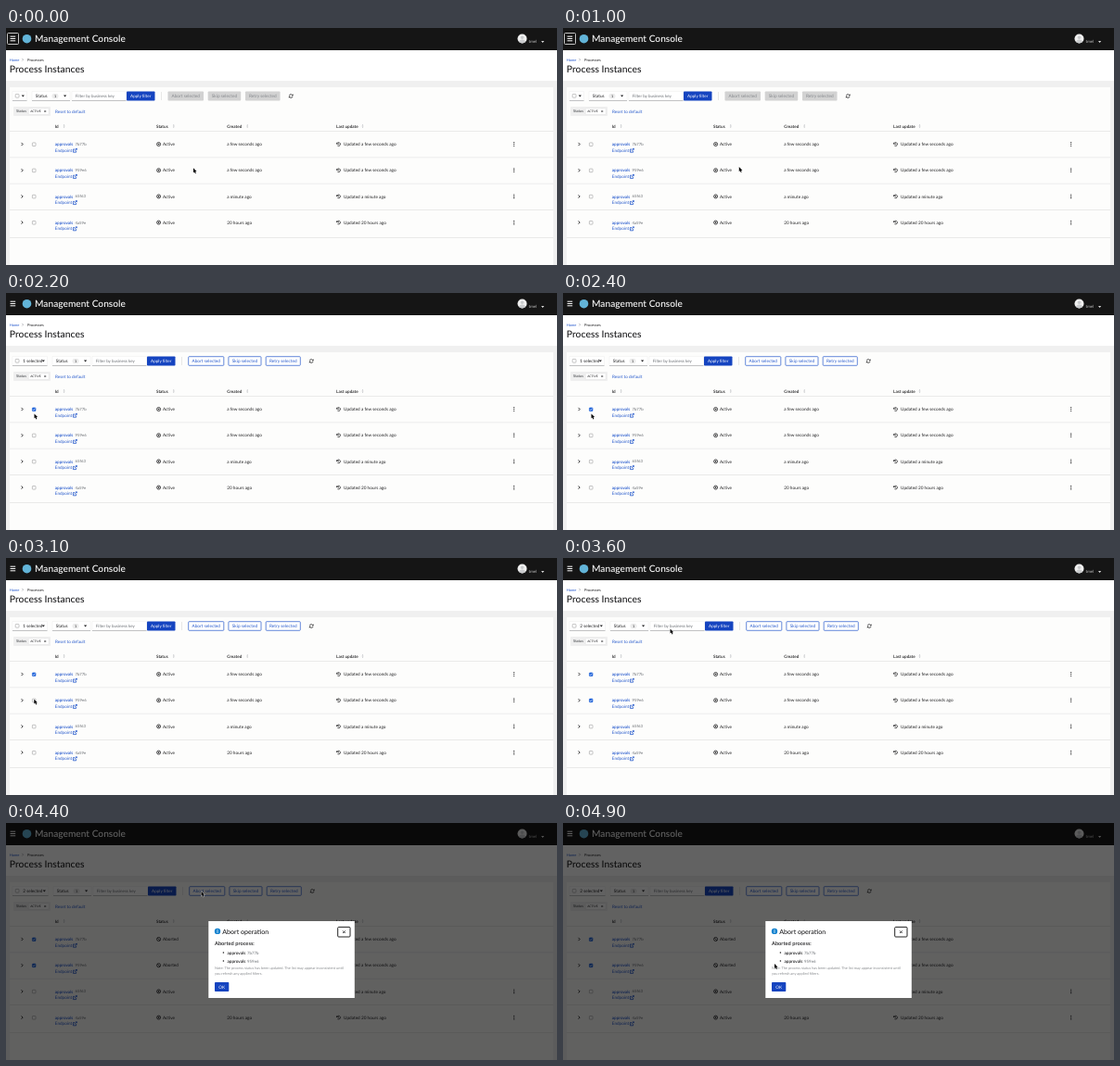
Recreate the animation shown at these times as an HTML page with a canvas. Size 594x256 px, loop 5 s.

```html
<!DOCTYPE html>
<html lang="en">
<head>
<meta charset="utf-8">
<title>Management Console</title>
<style>
html, body { margin: 0; width: 100%; height: 100%; overflow: hidden; background: #fff; }
canvas { display: block; width: 594px; height: 256px; }
</style>
</head>
<body>
<canvas id="stage"></canvas>
<script>
const W = 594, H = 256, LOOP = 5000, STEP = 100;
const BLUE = '#1544c0', LINK = '#2458cc', INK = '#1d1d1f', GREY = '#6a6e73', PALE = '#d2d2d2';
const canvas = document.getElementById('stage');
const dpr = window.devicePixelRatio || 1;
canvas.width = W * dpr;
canvas.height = H * dpr;
const ctx = canvas.getContext('2d');

// Text is laid out ten times larger, so that small advances are not rounded.
function text(str, x, cy, size = 4.7, color = INK, weight = 400, align = 'left') {
  ctx.save();
  ctx.translate(x, cy + size * 0.36);
  ctx.scale(0.1, 0.1);
  ctx.font = `${weight} ${size * 10}px Lato, "Open Sans", sans-serif`;
  ctx.textRendering = 'geometricPrecision';
  ctx.textAlign = align;
  ctx.fillStyle = color;
  ctx.fillText(str, 0, 0);
  ctx.restore();
}

function rect(x, y, w, h, color) {
  ctx.fillStyle = color;
  ctx.fillRect(x, y, w, h);
}

function box(x, y, w, h, r, fill, stroke, lw = 0.6) {
  ctx.beginPath();
  ctx.roundRect(x, y, w, h, r);
  if (fill) { ctx.fillStyle = fill; ctx.fill(); }
  if (stroke) { ctx.strokeStyle = stroke; ctx.lineWidth = lw; ctx.stroke(); }
}

function line(pts, color, lw = 0.7) {
  ctx.beginPath();
  pts.forEach(([x, y], i) => i ? ctx.lineTo(x, y) : ctx.moveTo(x, y));
  ctx.strokeStyle = color;
  ctx.lineWidth = lw;
  ctx.stroke();
}

function poly(pts, color) {
  ctx.beginPath();
  pts.forEach(([x, y]) => ctx.lineTo(x, y));
  ctx.closePath();
  ctx.fillStyle = color;
  ctx.fill();
}

function dot(x, y, r, color) {
  ctx.beginPath();
  ctx.arc(x, y, r, 0, Math.PI * 2);
  ctx.fillStyle = color;
  ctx.fill();
}

function ring(x, y, r, color, lw = 0.7, from = 0, to = Math.PI * 2) {
  ctx.beginPath();
  ctx.arc(x, y, r, from, to);
  ctx.strokeStyle = color;
  ctx.lineWidth = lw;
  ctx.stroke();
}

const caret = (x, y, color = INK) =>
  poly([[x - 1.6, y - 0.9], [x + 1.6, y - 0.9], [x, y + 1]], color);

function cross(x, y, r, color, lw) {
  line([[x - r, y - r], [x + r, y + r]], color, lw);
  line([[x + r, y - r], [x - r, y + r]], color, lw);
}

function checkbox(x, y, on) {
  box(x - 1.8, y - 1.8, 3.6, 3.6, 0.6, on ? '#1a5fd8' : '#fff', on ? '#1a5fd8' : '#9a9a9a', 0.6);
  if (on) line([[x - 1.1, y], [x - 0.3, y + 0.9], [x + 1.2, y - 1]], '#fff', 0.7);
}

function topBar(focus) {
  rect(0, 0, W, 24, '#151515');
  if (focus) box(1.5, 5.5, 12, 12, 1, null, '#d8d8d8', 0.9);
  for (const y of [9.2, 11.5, 13.8]) line([[4.6, y], [10.2, y]], '#fff', 1);
  dot(22.5, 11.7, 4.8, '#62b4d8');
  text('Management Console', 31, 11.8, 10.2, '#fff', 500);

  dot(556.5, 11.5, 5, '#f0f0f0');
  ctx.save();
  ctx.beginPath();
  ctx.arc(556.5, 11.5, 5, 0, Math.PI * 2);
  ctx.clip();
  dot(556.5, 10.3, 1.7, '#c9cbcd');
  dot(556.5, 16, 3.6, '#c9cbcd');
  ctx.restore();
  text('tmel', 563.6, 14.8, 4.4, '#c4c4c4');
  caret(578.6, 15, '#e0e0e0');
}

function pageHead() {
  rect(0, 24, W, 33, '#fff');
  text('Home', 3.8, 34.2, 4, LINK);
  line([[17.3, 32.9], [18.6, 34.2], [17.3, 35.5]], GREY, 0.5);
  text('Processes', 23, 34.2, 4.1);
  text('Process Instances', 3.8, 44, 10.4, INK, 500);
}

function field(x, w) {
  box(x, 68.5, w, 10, 0, '#fff', '#ececec', 0.5);
  rect(x, 78.1, w, 0.5, '#8a8d90');
}

function refresh(x, y) {
  ring(x, y, 1.9, INK, 0.7, Math.PI * 1.08, Math.PI * 1.85);
  ring(x, y, 1.9, INK, 0.7, Math.PI * 0.08, Math.PI * 0.85);
  poly([[x + 2.3, y - 2.2], [x + 2.3, y - 0.3], [x + 0.5, y - 0.3]], INK);
  poly([[x - 2.3, y + 2.2], [x - 2.3, y + 0.3], [x - 0.5, y + 0.3]], INK);
}

function action(label, x, w, enabled, focus) {
  if (!enabled) box(x, 68.5, w, 10, 0.8, PALE);
  else if (focus) box(x + 0.3, 68.8, w - 0.4, 9.4, 1, '#fff', '#173a86', 1.4);
  else box(x + 0.2, 68.7, w - 0.4, 9.6, 0.8, '#fff', LINK, 0.7);
  text(label, x + w / 2, 73.5, 4.75, enabled ? LINK : '#85888c', 400, 'center');
}

function toolbar(count, focus) {
  const dx = [0, 22, 23][count];
  field(7, 15.5 + dx);
  box(10.2, 71.4, 3.8, 3.8, 0.7, '#fff', '#a0a0a0', 0.6);
  if (count) text(count + ' selected', 18.2, 73.5);
  caret(18.3 + dx, 73.5);

  field(28 + dx, 41);
  text('Status', 31.8 + dx, 73.5);
  box(49.5 + dx, 70.8, 7, 5.4, 2.7, '#ececec');
  text('1', 53 + dx, 73.5, 3.8, INK, 400, 'center');
  caret(63.6 + dx, 73.5);

  field(71 + dx, 58.5);
  text('Filter by business key', 74.8 + dx, 73.5, 4.5, GREY);
  box(130 + dx, 68.5, 30.5, 10, 0.8, BLUE);
  text('Apply filter', 145.2 + dx, 73.5, 4.6, '#fff', 400, 'center');
  rect(167 + dx, 69, 0.5, 9, PALE);

  action('Abort selected', 174.5 + dx, 38.5, count > 0, focus);
  action('Skip selected', 217.7 + dx, 35.5, count > 0);
  action('Retry selected', 258 + dx, 37.5, count > 0);
  refresh(307.2 + dx, 73.5);
}

function chips() {
  box(8, 85, 40, 10, 1, '#efefef');
  text('Status', 11, 90, 4.1, '#3c3f42');
  box(24.2, 86.8, 22, 6.6, 0.8, '#fff', '#dcdcdc', 0.5);
  text('ACTIVE', 26.2, 90, 3.3, INK);
  cross(42.2, 90, 0.9, INK, 0.6);
  text('Reset to default', 53, 90, 4.65, LINK);
}

function sorter(x, y) {
  poly([[x - 0.9, y - 0.6], [x + 0.9, y - 0.6], [x, y - 2]], '#b5b8bb');
  poly([[x - 0.9, y + 0.6], [x + 0.9, y + 0.6], [x, y + 2]], '#b5b8bb');
}

function tableHead() {
  const cols = [['Id', 52.8, 62.6], ['Status', 162, 180.8], ['Created', 238.2, 260.2], ['Last update', 356, 384.5]];
  for (const [label, x, sx] of cols) {
    text(label, x, 106, 4.6, INK, 600);
    sorter(sx, 106);
  }
  rect(4, 111.3, 586, 0.6, '#dedede');
}

function linkIcon(x, y) {
  line([[x + 1.9, y - 1.2], [x, y - 1.2], [x, y + 2], [x + 3.2, y + 2], [x + 3.2, y + 0.3]], LINK, 0.8);
  line([[x + 1.3, y + 0.7], [x + 3.9, y - 1.9]], LINK, 0.8);
  poly([[x + 2.2, y - 2.3], [x + 4.3, y - 2.3], [x + 4.3, y - 0.2]], LINK);
}

function history(x, y) {
  ring(x, y, 1.9, INK, 0.7, -Math.PI * 0.85, Math.PI * 0.75);
  poly([[x - 2.4, y - 2], [x - 2.4, y], [x - 0.5, y]], INK);
  line([[x, y - 1.1], [x, y + 0.2], [x + 0.9, y + 0.7]], INK, 0.6);
}

const ROWS = [
  ['7b77b', 'a few seconds ago'],
  ['959e6', 'a few seconds ago'],
  ['65f63', 'a minute ago'],
  ['4a59e', '20 hours ago']
];

function row(i, checked, aborted) {
  const [id, age] = ROWS[i], y = 125.5 + i * 28.2;
  line([[16.6, y - 1.6], [18.1, y], [16.6, y + 1.6]], INK, 0.9);
  checkbox(30.2, y + 0.2, checked);
  text('approvals', 52.8, y, 4.6, LINK, 600);
  text(id, 74.4, y, 4.3, GREY);
  text('Endpoint', 52.8, y + 6.7, 4.65, LINK);
  linkIcon(72.4, y + 6.7);

  ring(164.6, y, 2, INK, 0.8);
  if (aborted) line([[163.2, y - 1.4], [166, y + 1.4]], INK, 0.8);
  else poly([[163.9, y - 1.1], [165.9, y], [163.9, y + 1.1]], INK);
  text(aborted ? 'Aborted' : 'Active', 169, y);

  text(age, 238.2, y);
  history(358.6, y);
  text('Updated ' + age, 364, y);
  if (!aborted) for (const d of [-1.8, 0, 1.8]) dot(547.7, y + d, 0.6, INK);
  rect(4, i < 3 ? y + 14.1 : 226, 586, 0.6, '#dedede');
}

function modal() {
  rect(0, 0, W, H, 'rgba(3,3,3,.62)');
  rect(218.3, 106, 157.5, 83, '#fff');
  dot(228, 116.9, 3.2, '#1583cf');
  rect(227.6, 115, 0.8, 0.9, '#fff');
  rect(227.6, 116.4, 0.8, 2.3, '#fff');
  text('Abort operation', 233.2, 117, 7.1, INK, 500);
  box(357.7, 112.4, 13.3, 10.6, 1, '#fff', '#222', 1);
  cross(364.4, 117.7, 1.3, INK, 0.9);
  text('Aborted process:', 225, 130, 5.7, INK, 600);
  [140, 149].forEach((y, i) => {
    dot(234.4, y, 0.8, INK);
    text('approvals', 238.4, y, 4.7, INK, 600);
    text(ROWS[i][0], 260, y, 4.4, GREY);
  });
  text('Note: The process status has been updated. The list may appear inconsistent until', 225, 157, 3.9, '#8a8d90');
  text('you refresh any applied filters.', 225, 162.5, 3.9, '#8a8d90');
  box(225, 172, 15.3, 10, 0.8, BLUE);
  text('OK', 232.7, 177.1, 4.7, '#fff', 400, 'center');
}

// time, x, y
const PATH = [
  [0, 202, 151.3], [900, 202, 151.3], [1500, 37, 135], [1600, 30, 130.5], [1700, 27.2, 128.8],
  [1900, 27.2, 128.8], [2200, 30.5, 130.4], [2700, 30.5, 130.4], [2800, 30.3, 148],
  [2900, 30.3, 148], [3000, 30.3, 152.5], [3200, 30.3, 152.5], [3500, 98, 77],
  [3900, 210.5, 73.8], [4500, 210.5, 73.8], [4900, 228, 152], [5000, 228, 152]
];

function pointer(t) {
  const i = PATH.findIndex((p, k) => k && t <= p[0]);
  const [t0, x0, y0] = PATH[i - 1], [t1, x1, y1] = PATH[i];
  const u = (t - t0) / (t1 - t0), e = u * u * (3 - 2 * u);
  ctx.save();
  ctx.translate(x0 + (x1 - x0) * e, y0 + (y1 - y0) * e);
  const arrow = [[0, 0], [0, 5], [1.1, 4.1], [2, 6], [2.9, 5.6], [2.1, 3.8], [3.6, 3.7]];
  line([...arrow, arrow[0]], 'rgba(255,255,255,.85)', 0.8);
  poly(arrow, '#000');
  ctx.restore();
}

function draw(t) {
  const count = t < 2200 ? 0 : t < 3200 ? 1 : 2;
  const done = t >= 4400;
  ctx.setTransform(dpr, 0, 0, dpr, 0, 0);
  rect(0, 0, W, H, '#f0f0f0');
  topBar(count === 0);
  pageHead();
  rect(4, 64, 586, 192, '#fdfdfc');
  toolbar(count, t >= 4200 && !done);
  chips();
  tableHead();
  ROWS.forEach((_, i) => row(i, i < count, done && i < 2));
  if (done) modal();
  pointer(t);
}

const start = performance.now();
function tick() {
  const t = (performance.now() - start) % LOOP;
  draw(Math.floor(t / STEP) * STEP);
  requestAnimationFrame(tick);
}
tick();
</script>
</body>
</html>
```
